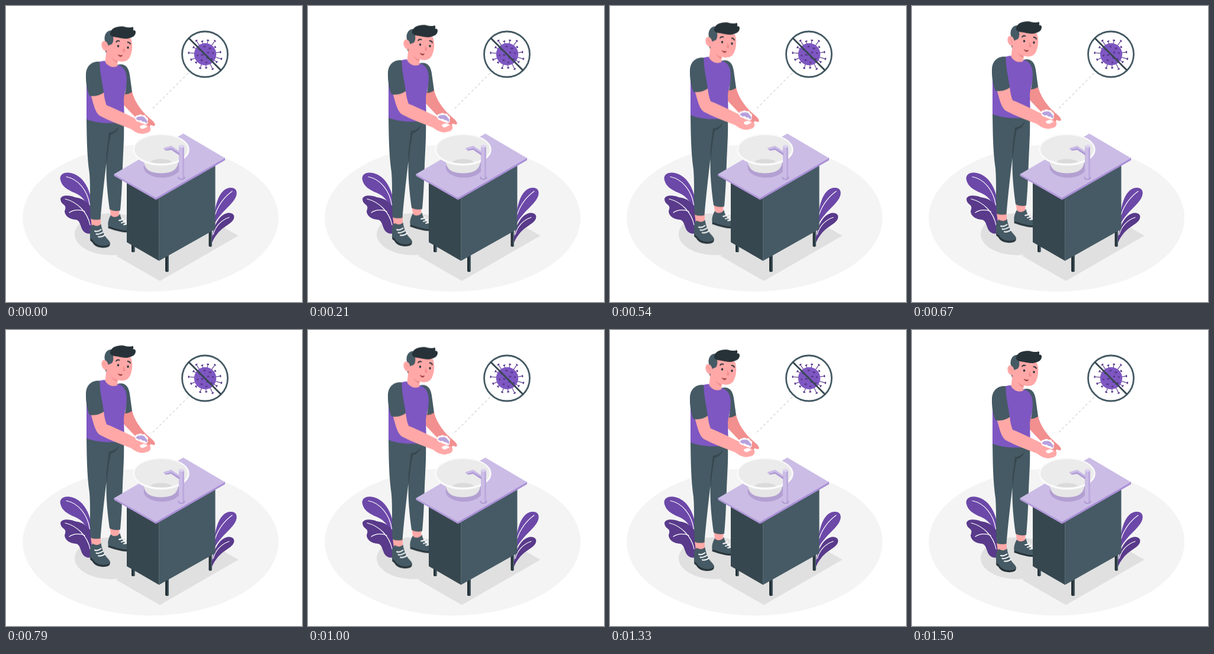
An HTML page for the animation above (1540 ms loop, 500 by 500 pixels).

```html
<!DOCTYPE html>
<html lang="en">
<head>
<meta charset="utf-8">
<title>Hand washing</title>
<style>
  html, body { margin: 0; width: 100%; height: 100%; overflow: hidden; background: #fff; }
  svg { display: block; width: 100%; height: 100%; }
  .line { fill: none; stroke: #fff; stroke-width: 1.2; stroke-linecap: round; }
  .slate { fill: #455a64; }
  .deep { fill: #37474f; }
  .ink { fill: #263238; }
  .skin { fill: #ffa8a7; }
  .blush { fill: #f28f8f; }
  .purple { fill: #7e57c2; }
</style>
</head>
<body>
<svg viewBox="0 0 500 500">
  <ellipse cx="244.300" cy="358" rx="216" ry="124.500" fill="#f4f4f4"/>
  <g fill="#e0e0e0">
    <ellipse cx="178" cy="385.500" rx="62" ry="35.500"/>
    <path d="M186 422L260 464.500L392.500 388L319 346Z"/>
  </g>

  <g id="plants">
    <path fill="#6c48a8" d="M146 352C147 322 136 285 106 281.500C95 280.500 90 287 92 294C95 307 108 312 119 317C130 322 138 334 146 352Z"/>
    <path class="line" d="M102 288.500C122 292 138 312 141.500 336"/>
    <path fill="#593a8b" d="M92 326C93 319 107 319 116 323C130 325 142 331 146 350V383C139 387 131 383 128 376C125 368 124 362 118 361C108 360 100 356 99 347C100 343 102 339 98 336C94 333 92 330 92 326Z"/>
    <path class="line" d="M100 326C121 331 138 349 142 370M107 349C115 343 127 344 133 347"/>
    <path fill="#6c48a8" d="M350 372C352 340 358 310 378 307C389 306 392 314 388 323C381 338 363 346 350 372Z"/>
    <path class="line" d="M353 353C358 337 369 322 382 313"/>
    <path fill="#593a8b" d="M347 402C348 378 357 354 373 350C383 348 388 354 384 361C377 372 359 373 347 402Z"/>
    <path class="line" d="M350 386C354 372 363 362 377 357"/>
  </g>

  <g id="sign">
    <path d="M307.500 113.500L245 176" fill="none" stroke="#d4d4d4" stroke-width="1.300" stroke-dasharray="4 4"/>
    <circle cx="336" cy="81.500" r="38.500" fill="#fff" stroke="#455a64" stroke-width="2.800"/>
    <g id="virus"></g>
    <path d="M308.800 54.300L363.200 108.700" stroke="#37474f" stroke-width="2.800"/>
  </g>

  <g id="man">
    <path class="blush" d="M199 148L213 145C216 160 227 176 239 187L248 195C251 198 253 202 251 203C247 204 243 201 239 199L231 203C221 190 206 176 199 168Z"/>

    <path class="skin" d="M175.500 344H192L190.500 357C187 361 181 361 177.500 357Z"/>
    <path class="ink" d="M173 369L172.500 376C182 379 195 384 208 383V376Z"/>
    <path class="slate" d="M177 354C174 359 171 367 173 373C183 376 195 381 208 380V373C200 369 194 362 192.500 352C189 358 181 359 177 354Z"/>
    <path class="line" style="stroke-width:1.900" d="M191 363C194 363 196 362 198 360M195 367C198 367 200 365 202 363.500M199 370C202 370 204 369 205 367.500"/>

    <path class="skin" d="M143 358H160L160 374C156 378 149 378 145 374Z"/>
    <path class="ink" d="M142 388L142.300 397L146 400C150 409 165 411 173 407.500C176 406 176 403 175.500 400Z"/>
    <path class="slate" d="M147 370C141 373 141.500 384 142.300 393L147 397C152 406 166 408 174 404C177 401 175 398 172 395C166 389 162 380 160.500 369C157 373 151 373 147 370Z"/>
    <path class="line" style="stroke-width:2" d="M150 381C153 382 157 381 160.500 378.500M152.500 386C156 387 160 385 163.500 383M156 390.500C160 391 164 390 167 387.500"/>

    <path class="slate" d="M136 190L199 194C200 222 198 246 197 272C196 302 195 325 193 346C188 348 179 347 175 344C171 316 169 291 169.500 266C166 295 162 331 159.500 361C154 362.500 147 362 143 360C141 333 143 308 141 284C136.500 253 136.500 220 136 190Z"/>
    <path class="deep" d="M191 204C186 211 181 214 174 214.500L169.500 252L170 270C172 246 174 231 177 218C184 216 189 211 191 204Z"/>

    <path class="purple" d="M157 95C162 94 166 93 169 94C174 103 181 104 187 100.500C198 99 205 111 205 124C205 137 200 146 199 158L200 196C180 200.500 152 199 136 192V125Z"/>
    <path class="slate" d="M188 100C201 97 207 104 209 117L213 146C209 148.500 205 150 201 150C203 139 205 126 203 116C201 107 196 102 188 100Z"/>

    <path class="deep" d="M166 70L169.500 82L174 76Z"/>
    <path class="skin" d="M176 52C190 50 204 51 211 56C214.500 64 214 78 209 87.500C205 94.500 197 96 188.500 93.500L188 102.500C180 106 171 102 167.500 95L170 72Z"/>
    <path class="blush" d="M178 87C181 91 185 93 188.500 93.500L188.300 97C183 95.500 180 91.500 178 87Z"/>
    <path class="slate" d="M180 42C170 41 166 49 166.500 57C167 61 169 65 172 68L179 65C181 62 182 58 181 53Z"/>
    <ellipse class="skin" cx="167" cy="68" rx="5.500" ry="8.500" transform="rotate(-14 167 68)"/>
    <path d="M164 65C167 65 169 68 169 71" fill="none" stroke="#f28f8f" stroke-width="1"/>
    <path class="ink" d="M176 46C178 37 190 34 199 35.500C205 37 211 38 214 36C216 38 215 40 214.500 41.500C217 41.500 219 42 219 45C219 51 214 54 207 55.500C200 57 195 55 189 54C184 53 180 53 178 51C176 50 175.500 48 176 46Z"/>
    <ellipse class="ink" cx="189.500" cy="68.500" rx="1.700" ry="2.100"/>
    <ellipse class="ink" cx="206" cy="71" rx="1.700" ry="2.100"/>
    <path d="M186 61.500C187.500 59.500 189.500 59 191.500 60M205.500 62C208 62 209.500 63.500 210 65" fill="none" stroke="#263238" stroke-width="1.800" stroke-linecap="round"/>
    <path class="blush" d="M198.500 69C199 73 202 75 201.500 77C201 79 199 79 197 78Z"/>
    <path d="M188.500 82C191 84 194 84.500 197 83.500C196 88 191 87.500 188.500 82Z" fill="#9b3d3d"/>

    <path class="skin" d="M143 150C150 152 159 150 165 146C166 154 167 162 170 168.500C187 175 206 185 220 191.500C231 194 240 199 243.500 205C246 211 242 215 236 215.500C228 219 218 214 211 208.500C194 202 175 195 158 186C150 180 147 163 143 150Z"/>
    <path class="slate" d="M158.500 95C145.500 93 135 102 135 117C134.500 133 138 146 141 152.500C151 154 160 151 165 147C163 130 158 113 158.500 95Z"/>

    <path class="blush" d="M231 188L239 190L246 198L241 208L232 206Z"/>
    <path fill="#fff" d="M218 190C218 186 221 185 223.500 185.500C226 183 229 184 231 185.500C234 184 236.500 186 236.500 188.500C240 189 241 193 239 195.500C241 199 237 202 234 201C230 202 227 199 226 197C221 196 218 194 218 190Z"/>
    <path fill="#b7a1dd" d="M219.500 192C220 188 224 187 227 187.500C231 186.500 235 189 236 192C239 194 239 197 237.500 199C235 198 235 195.500 232 196C229 196.500 229 193 226 194C223 195 222 192 219.500 192Z"/>
    <path class="skin" d="M219 195C224 197 230 199 236 201C241 202 244 205 243.500 209C242 214 236 215 231 214L218 210Z"/>
    <path fill="#fff" d="M226 205C227 202 230 203 232 201.500C235 201 236 203 238.500 203.500C239 206.500 235 206 233.500 207.500C230 209 227 208 226 205Z"/>
  </g>

  <g id="cabinet">
    <path class="ink" d="M212 398H217.500V415Q214.700 417 212 415ZM269 420H275V448Q272 450.500 269 448ZM342.500 376H348V405.500Q345.200 408 342.500 405.500Z"/>
    <path class="slate" d="M215.500 398H217.500V415L215.500 416ZM273 420H275V448L273 449ZM346 376H348V405.500L346 406.500Z"/>
    <path class="deep" d="M204 292L258.500 322V430.500L204 399Z"/>
    <path class="slate" d="M258.500 320L353.500 264V377L258.500 430.500Z"/>
    <path d="M258.500 325V430" stroke="#566a73" stroke-width=".8"/>
    <path fill="#b29ad9" d="M182.500 283.500L253.500 323V327.500L182.500 287Z"/>
    <path fill="#a98fd6" d="M253.500 323L370 256V260.500L253.500 327.500Z"/>
    <path fill="#cbbce6" d="M182.500 284L299.500 215.500L370 257L253.500 324Z"/>
    <ellipse cx="263.500" cy="272" rx="31" ry="18" fill="#b3a0d2"/>
    <path fill="#e6e6e6" d="M232.500 260C233 270 237 276 244 279.500C254 283.500 270 283.500 280 279.500C287 276 291 270 291.500 260Z"/>
    <ellipse cx="262" cy="242.700" rx="47.700" ry="27" fill="#fafafa"/>
    <ellipse cx="262" cy="242" rx="45" ry="24" fill="#ebebeb"/>
    <path fill="#dadada" d="M244 264C246 256.500 278 256.500 280 264C270 266.500 255 266.500 244 264Z"/>
    <ellipse cx="296.500" cy="290" rx="6" ry="3.500" fill="#a993cf"/>
    <path fill="#cbbce6" d="M292 237Q296.500 233 301 237V290Q296.500 294 292 290Z"/>
    <path fill="#bcaadd" d="M298 236L301 237V290L298 292Z"/>
    <path fill="#b09bd6" d="M266 241L278 237.500L293 247V252.500L279 243L270 244.500Z"/>
    <path fill="#cbbce6" d="M266 240L279 236L293 245.500V248.500L279 240L268 243Z"/>
    <ellipse cx="296.500" cy="237" rx="4.500" ry="2.400" fill="#ddd3f0"/>
  </g>
</svg>
<script>
  const NS = 'http://www.w3.org/2000/svg';
  const virus = document.getElementById('virus');
  const man = document.getElementById('man');

  function add(tag, attrs) {
    const el = document.createElementNS(NS, tag);
    for (const key in attrs) el.setAttribute(key, attrs[key]);
    virus.append(el);
  }

  // Spikes as [angle in degrees, length from the centre].
  const spikes = [
    [-79, 24], [-54, 28], [-36, 21], [-8, 26], [16, 28.5], [34, 23.5],
    [63, 28], [86, 23], [110, 25], [138, 21], [159, 25.5], [185, 28],
    [211, 23], [237, 27.5], [257, 22.5]
  ];
  const [cx, cy] = [336.5, 81.5];
  for (const [deg, len] of spikes) {
    const spin = `translate(${cx} ${cy}) rotate(${deg})`;
    add('path', { d: `M16 0H${len}`, transform: spin, stroke: '#593a8b', 'stroke-width': 1.1 });
    add('ellipse', { cx: len, rx: 1.2, ry: 2.1, transform: spin, fill: '#593a8b' });
  }
  add('circle', { cx, cy, r: 18.7, fill: '#7e57c2' });

  const spots = [[-10, -8], [-1, -13], [8, -10], [13, -2], [5, -3], [-5, 1], [-13, 2], [-6, 10], [4, 6], [2, 14], [11, 8]];
  spots.forEach(([x, y], i) => add('ellipse', {
    cx: cx + x, cy: cy + y, rx: 1.6 + i % 3 * 0.4, ry: 1.6, fill: '#593a8b'
  }));

  man.animate(
    [0, -10, 0].map(y => ({ transform: `translateY(${y}px)` })),
    { duration: 1540, iterations: Infinity, iterationStart: 1 / 37, easing: 'linear' }
  );
</script>
</body>
</html>
```
